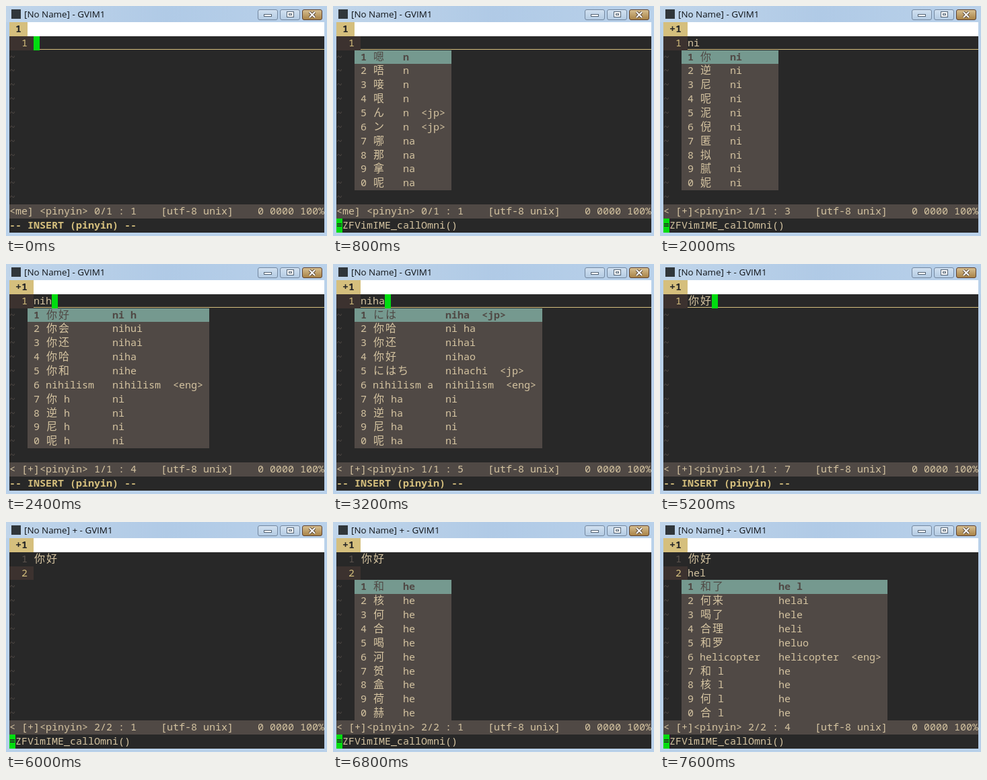
These frames come from a looping animation (477x342 px, 8 s). An HTML page with a canvas:

```html
<!DOCTYPE html>
<html lang="zh">
<head>
<meta charset="utf-8">
<style>
html, body { margin: 0; width: 100%; height: 100%; overflow: hidden; background: #b9d1ea; }
canvas { display: block; }
</style>
</head>
<body>
<canvas id="stage" width="477" height="342"></canvas>
<script>
const g = document.getElementById("stage").getContext("2d");
const LEFT = 5, TOP = 24, CELL = 9, COLS = 52, STEP = 400, LOOP = 8000;
const BG = "#282828", PANEL = "#504945", TEXT = "#d5c4a1", GOLD = "#d5bf7d", GREEN = "#00dc10";
const MONO = '15px "Noto Sans Mono", "DejaVu Sans Mono", monospace';
const HAN = '16px "Noto Sans CJK SC", "Noto Sans CJK", sans-serif';

// Candidate lists: word:key, in menu order
const list = s => s.split(",").map(c => c.split(":"));
const menus = {
  n: list("嗯:n,唔:n,唼:n,哏:n,ん:n  <jp>,ン:n  <jp>,哪:na,那:na,拿:na,呢:na"),
  ni: list("你:ni,逆:ni,尼:ni,呢:ni,泥:ni,倪:ni,匿:ni,拟:ni,腻:ni,妮:ni"),
  nih: list("你好:ni h,你会:nihui,你还:nihai,你哈:niha,你和:nihe,nihilism:nihilism  <eng>,你 h:ni,逆 h:ni,尼 h:ni,呢 h:ni"),
  niha: list("には:niha  <jp>,你哈:ni ha,你还:nihai,你好:nihao,にはち:nihachi  <jp>,nihilism a:nihilism  <eng>,你 ha:ni,逆 ha:ni,尼 ha:ni,呢 ha:ni"),
  nihao: list("你好:nihao,には及ばない:nihaoyobanai  <jp>,nihilism ao:nihilism  <eng>,你 hao:ni,逆 hao:ni,尼 hao:ni,呢 hao:ni,泥 hao:ni,倪 hao:ni,匿 hao:ni"),
  h: list("哈:ha,蛤:ha,铪:ha,还:hai,海:hai,害:hai,孩:hai,和:he,好:hao,会:hui"),
  he: list("和:he,核:he,何:he,合:he,喝:he,河:he,贺:he,盒:he,荷:he,赫:he"),
  hel: list("和了:he l,何来:helai,喝了:hele,合理:heli,和罗:heluo,helicopter:helicopter  <eng>,和 l:he,核 l:he,何 l:he,合 l:he")
};

// One entry per step: text, position, menu, prompt, character under the cursor
const NUL = "  0 0000", N = "110 006e", CALL = "call", FIX = "fix";
const steps = [
  ["", "0/1 : 1"],
  ["", "0/1 : 1", , CALL],
  ["", "0/1 : 1", "n", CALL],
  ["n", "1/1 : 1", "n", FIX, N],
  ["ni", "1/1 : 3", "ni"],
  ["ni", "1/1 : 3", "ni", CALL],
  ["nih", "1/1 : 4", "nih"],
  ["nih", "1/1 : 4", "nih", CALL],
  ["niha", "1/1 : 5", "niha"],
  ["niha", "1/1 : 5", "niha", CALL],
  ["nihao", "1/1 : 6", "nihao"],
  ["nihao", "1/1 : 1", "nihao", , N],
  ["nihao", "1/1 : 6", "nihao"],
  ["你好", "1/1 : 7"],
  ["", "2/2 : 1"],
  ["", "2/2 : 1", , CALL],
  ["", "2/2 : 1", "h", FIX],
  ["", "2/2 : 1", "he", CALL],
  ["hel", "2/2 : 4", "hel"],
  ["hel", "2/2 : 4", "hel", CALL]
];

const rowY = r => Math.floor(TOP + 0.45 + r * 20.84);
const wide = c => c > "\u2e80" ? 2 : 1;
const width = s => [...s].reduce((n, c) => n + wide(c), 0);

function box(x, y, w, h, color) {
  g.fillStyle = color;
  g.fillRect(x, y, w, h);
}

function fill(row, col, cols, color) {
  box(LEFT + col * CELL, rowY(row), cols * CELL, rowY(row + 1) - rowY(row), color);
}

function put(row, col, text, color = TEXT, bold = false) {
  g.fillStyle = color;
  for (const c of text) {
    const han = wide(c) > 1;
    g.font = han ? (bold ? "500 " : "300 ") + HAN : (bold ? "bold " : "") + MONO;
    g.fillText(c, LEFT + col * CELL + (han ? 1 : 0), rowY(row) + 15);
    col += wide(c);
  }
}

function button(x, top, bottom, edge) {
  const shade = g.createLinearGradient(0, 5, 0, 20);
  shade.addColorStop(0, top);
  shade.addColorStop(1, bottom);
  g.beginPath();
  g.roundRect(x + 0.5, 5.5, 29, 15, 2.5);
  g.fillStyle = shade;
  g.fill();
  g.strokeStyle = edge;
  g.lineWidth = 1;
  g.stroke();
}

function windowFrame(title) {
  box(0, 0, 477, 342, "#b9d1ea");
  const bar = g.createLinearGradient(0, 0, 477, 0);
  bar.addColorStop(0, "#c0d5ea");
  bar.addColorStop(0.5, "#b0cae6");
  bar.addColorStop(1, "#b9d1ea");
  box(0, 0, 477, TOP, bar);
  box(8, 5, 14, 14, "#30363a");
  g.fillStyle = "#101418";
  g.font = '13.4px "Open Sans", "Noto Sans", sans-serif';
  g.fillText(title, 27, 17);

  button(374, "#d3e2f1", "#b4cbe3", "#73879f");
  button(407, "#d3e2f1", "#b4cbe3", "#73879f");
  button(440, "#d9c295", "#a98347", "#5c4030");
  g.strokeStyle = "#526273";
  g.fillStyle = "#fff";
  g.fillRect(384, 13, 11, 3);
  g.strokeRect(383.5, 12.5, 11, 3);
  g.fillRect(418, 9, 9, 7);
  g.strokeRect(417.5, 8.5, 10, 8);
  g.strokeRect(420.5, 11.5, 4, 2);
  for (const [w, color] of [[4, "#5b4a3a"], [2, "#fff"]]) {
    g.lineWidth = w;
    g.strokeStyle = color;
    g.beginPath();
    g.moveTo(451, 9); g.lineTo(459, 17);
    g.moveTo(459, 9); g.lineTo(451, 17);
    g.stroke();
  }
}

function menu(items, row) {
  // Complete words carry one trailing blank
  const keyCol = 8 + Math.max(...items.map(([w]) => width(w) + (w.includes(" ") ? 0 : 1)));
  const end = Math.max(19, 1 + keyCol + Math.max(...items.map(([, k]) => k.length)));
  items.forEach(([word, key], i) => {
    const first = i === 0, color = first ? PANEL : TEXT;
    fill(row + i, 3, end - 3, first ? "#75998f" : PANEL);
    put(row + i, 4, String((i + 1) % 10), color, first);
    put(row + i, 6, word, color, first);
    put(row + i, keyCol, key, color, first);
  });
}

function draw(i) {
  const [text, pos, pum, call, code = NUL] = steps[i];
  const changed = pos[0] !== "0", row = +pos[2];
  windowFrame(`[No Name] ${i > 12 ? "+ " : ""}- GVIM1`);

  box(LEFT, TOP, COLS * CELL, 313, BG);
  fill(0, 0, COLS, "#fff");
  fill(0, 0, changed ? 4 : 3, GOLD);
  put(0, 1, changed ? "+1" : "1", BG, true);

  for (let r = row + 1; r < 13; r++) put(r, 0, "~", PANEL);
  if (row === 2) {
    put(1, 2, "1", "#5c544e");
    put(1, 4, "你好");
  } else {
    box(LEFT + 4 * CELL, 64, 48 * CELL, 1, GOLD);
  }
  fill(row, 0, 4, "#3c322f");
  put(row, 2, String(row), GOLD);
  put(row, 4, text);
  if (!call) fill(row, 4 + width(text), 1, GREEN);
  if (pum) menu(menus[pum], row + 1);

  fill(13, 0, COLS, PANEL);
  put(13, 0, `${changed ? "< [+]" : "<me] "}<pinyin> ${pos}    [utf-8 unix]  ${code} 100%`);
  if (call) {
    fill(14, 0, 1, GREEN);
    put(14, 0, "=", BG, true);
    put(14, 1, `ZFVimIME_${call}Omni()`);
  } else {
    put(14, 0, "-- INSERT (pinyin) --", GOLD, true);
  }
}

const start = performance.now();
function tick() {
  draw(Math.floor((performance.now() - start) % LOOP / STEP));
  requestAnimationFrame(tick);
}
tick();
</script>
</body>
</html>
```
